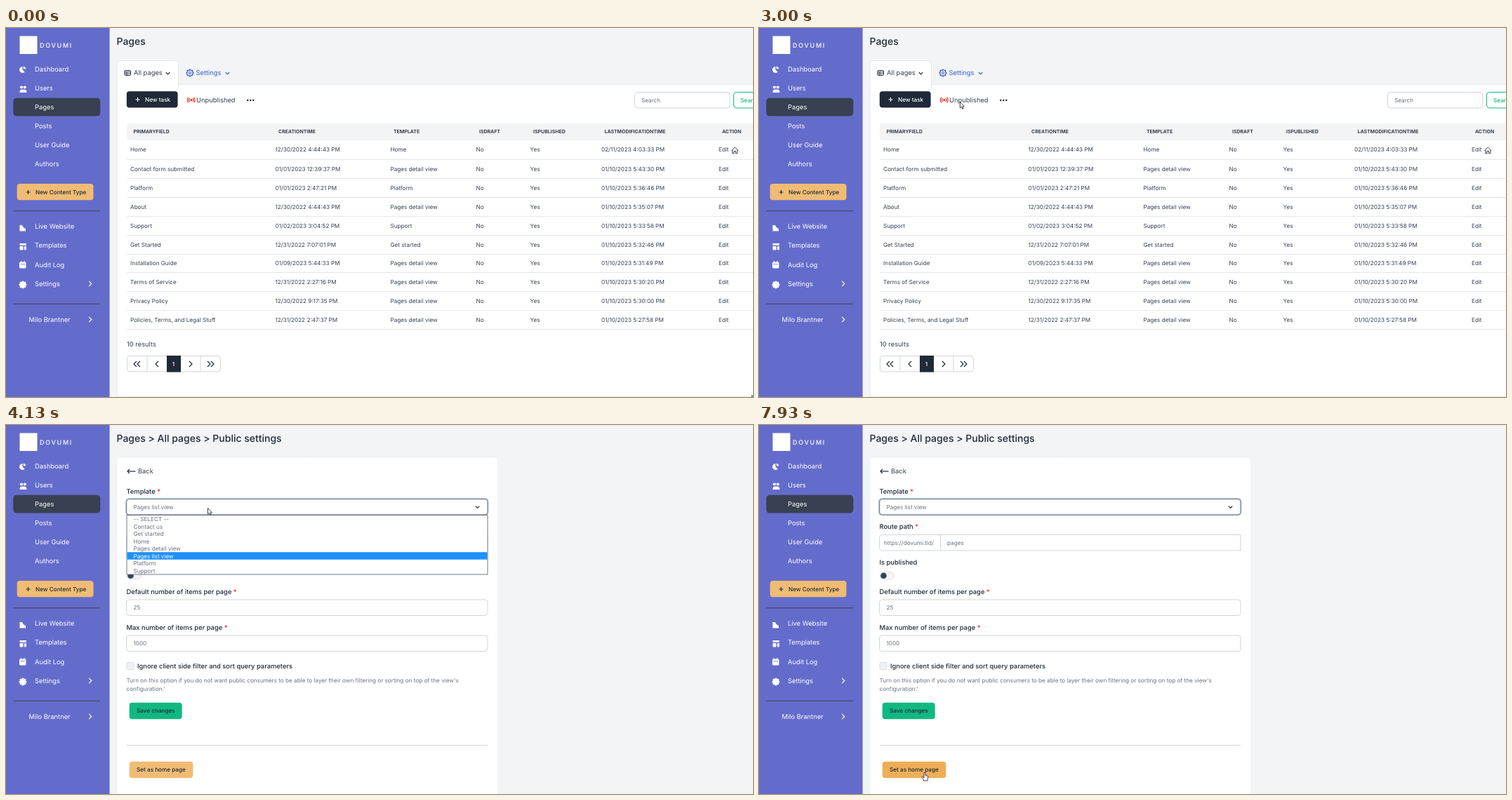
Write an HTML page with a canvas that moves like this. It is 1064 by 526 pixels and loops after 8000 ms.

```html
<!DOCTYPE html>
<html lang="en">
<head>
<meta charset="utf-8">
<title>Page settings</title>
<style>
  html, body { margin: 0; width: 100%; height: 100%; overflow: hidden; background: #f2f4f6; }
  canvas { display: block; }
</style>
</head>
<body>
<canvas id="stage" width="1064" height="526"></canvas>
<script>
const ctx = document.getElementById('stage').getContext('2d');
const LOOP = 8000, FPS = 15;
const INK = '#1f2937', BODY = '#374151', MUTED = '#6b7280', LINE = '#d1d5db', PALE = '#f2f4f6';
const AMBER = '#f0bc74', GREEN = '#10b981', BLUE = '#3f5fcb';
const SMALL = 8.16, MEDIUM = 9.35, LARGE = 14;

// y is the middle of the capitals
function text(s, x, y, size = SMALL, color = BODY, weight = 400) {
  ctx.font = `${weight} ${size}px Inter, sans-serif`;
  ctx.fillStyle = color;
  ctx.fillText(s, x, y + size * 0.364);
}

function box(x, y, w, h, r, fill, stroke, width = 1) {
  ctx.beginPath();
  ctx.roundRect(x, y, w, h, r);
  if (fill) { ctx.fillStyle = fill; ctx.fill(); }
  if (stroke) { ctx.strokeStyle = stroke; ctx.lineWidth = width; ctx.stroke(); }
}

function line(points, color, width = 1) {
  ctx.beginPath();
  points.forEach(([x, y]) => ctx.lineTo(x, y));
  ctx.strokeStyle = color;
  ctx.lineWidth = width;
  ctx.stroke();
}

function disc(x, y, r, color) {
  ctx.beginPath();
  ctx.arc(x, y, r, 0, 7);
  ctx.fillStyle = color;
  ctx.fill();
}

function ring(x, y, r, color, from = 0, to = 7, width = 1) {
  ctx.beginPath();
  ctx.arc(x, y, r, from, to);
  ctx.strokeStyle = color;
  ctx.lineWidth = width;
  ctx.stroke();
}

function shape(path, x, y, fill, stroke, width = 1) {
  const p = new Path2D(path);
  ctx.save();
  ctx.translate(x, y);
  if (fill) { ctx.fillStyle = fill; ctx.fill(p); }
  if (stroke) { ctx.strokeStyle = stroke; ctx.lineWidth = width; ctx.stroke(p); }
  ctx.restore();
}

const plus = (x, y, color) => shape('M-3 0H3M0 -3V3', x, y, null, color, 1.1);
const chevronDown = (x, y, color) => line([[x - 2.8, y - 1.4], [x, y + 1.4], [x + 2.8, y - 1.4]], color, 1.2);
const chevronSide = (x, y, dir, color, s = 4) =>
  line([[x - dir * s / 2, y - s], [x + dir * s / 2, y], [x - dir * s / 2, y + s]], color, 1.2);

function gear(x, y, r, color) {
  for (let i = 0; i < 8; i++) {
    const a = i * Math.PI / 4;
    disc(x + Math.cos(a) * r * 0.8, y + Math.sin(a) * r * 0.8, r * 0.32, color);
  }
  disc(x, y, r * 0.85, color);
}

function sidebar() {
  const white = '#fff';
  box(0, 0, 147.6, 526, 0, '#646ccb');
  box(19.5, 11.5, 25, 25.5, 0, white);
  ctx.letterSpacing = '1.7px';
  text('DOVUMI', 48, 24.5, 9, white, 500);
  ctx.letterSpacing = '0px';

  box(10.3, 99.8, 124, 25.8, 5, BODY);
  const items = [['Dashboard', 58.5], ['Users', 85.5], ['Pages', 112.5], ['Posts', 139.5], ['User Guide', 166.5],
    ['Authors', 193.5], ['Live Website', 283], ['Templates', 310], ['Audit Log', 337.5], ['Settings', 364.5]];
  items.forEach(([label, y]) => text(label, 41, y, MEDIUM, white));
  text('Milo Brantner', 32.5, 415.5, MEDIUM, white);
  chevronSide(120, 364.5, 1, white, 3.6);
  chevronSide(120, 415.5, 1, white, 3.6);

  box(15.7, 222, 108.8, 23.3, 4, AMBER);
  plus(31.5, 234, INK);
  text('New Content Type', 42, 234, SMALL, INK, 500);
  line([[10.5, 260.8], [134, 260.8]], BODY);
  line([[10.5, 393.3], [134, 393.3]], BODY);

  shape('M0 0V-4.5A4.5 4.5 0 1 0 3.2 3.2Z', 23.5, 59.5, white);
  shape('M1.3 -1.3V-5A5 5 0 0 1 5 -1.3Z', 23.5, 59.5, white);
  disc(22, 84.5, 2.1, white);
  disc(26.8, 84.5, 2.1, white);
  shape('M0 0Q0 -4.6 3.3 -4.2Q5 -4.8 6.5 -4.2Q10 -4.6 10 0Z', 19.5, 92, white);
  shape('M0 -8.5H3.5Q5 -4.5 8.5 -3.5V0H0Z', 19.5, 289.5, white);
  box(19.5, 307, 9.5, 2.8, 0.8, white);
  box(19.5, 311, 5.2, 5.4, 0.8, white);
  box(26, 311, 3, 5.4, 0.8, white);
  box(19, 333.5, 9.5, 9, 1.5, white);
  shape('M2.5 -1.5V1M7 -1.5V1', 19, 333.5, null, white, 1.2);
  line([[20.5, 336.7], [27, 336.7]], '#646ccb', 0.8);
  gear(24, 366, 5, white);
}

const COLUMNS = [177, 383.5, 547.5, 669.5, 746.5, 848, 1015];
const HEADERS = [['PRIMARYFIELD', 181.5], ['CREATIONTIME', 388], ['TEMPLATE', 552], ['ISDRAFT', 674],
  ['ISPUBLISHED', 751], ['LASTMODIFICATIONTIME', 852.5], ['ACTION', 1020]];
const DETAIL = 'Pages detail view';
const ROWS = [
  ['Home', '12/30/2022 4:44:43 PM', 'Home', '02/11/2023 4:03:33 PM'],
  ['Contact form submitted', '01/01/2023 12:39:37 PM', DETAIL, '01/10/2023 5:43:30 PM'],
  ['Platform', '01/01/2023 2:47:21 PM', 'Platform', '01/10/2023 5:36:46 PM'],
  ['About', '12/30/2022 4:44:43 PM', DETAIL, '01/10/2023 5:35:07 PM'],
  ['Support', '01/02/2023 3:04:52 PM', 'Support', '01/10/2023 5:33:58 PM'],
  ['Get Started', '12/31/2022 7:07:01 PM', 'Get started', '01/10/2023 5:32:46 PM'],
  ['Installation Guide', '01/09/2023 5:44:33 PM', DETAIL, '01/10/2023 5:31:49 PM'],
  ['Terms of Service', '12/31/2022 2:27:16 PM', DETAIL, '01/10/2023 5:30:20 PM'],
  ['Privacy Policy', '12/30/2022 9:17:35 PM', DETAIL, '01/10/2023 5:30:00 PM'],
  ['Policies, Terms, and Legal Stuff', '12/31/2022 2:47:37 PM', DETAIL, '01/10/2023 5:27:58 PM'],
];

function listView() {
  text('Pages', 157.5, 18.5, LARGE, INK, 500);
  box(158, 80.5, 920, 445, 0, '#fff', '#e5e7eb');
  box(158, 46.5, 87.5, 40, [4, 4, 0, 0], '#fff', '#e5e7eb');
  box(158.5, 80, 86.5, 10, 0, '#fff');

  box(169, 60.5, 8.5, 7, 1, null, INK, 1);
  shape('M0 2.2H8.5M0 4.6H8.5M3 2V7', 169, 60.5, null, INK, 0.9);
  text('All pages', 182, 63.5, MEDIUM, BODY);
  chevronDown(230.5, 64.5, INK);
  gear(262, 64, 5, BLUE);
  disc(262, 64, 3.5, PALE);
  ring(262, 64, 1.6, BLUE);
  text('Settings', 270.5, 63.5, MEDIUM, BLUE);
  chevronDown(315.5, 64.5, BLUE);

  box(171.8, 90.2, 72.8, 23.3, 4, INK);
  plus(187.5, 102, '#fff');
  text('New task', 198, 102, SMALL, '#fff', 500);
  const red = '#f0261c';
  disc(263.8, 102.5, 1.5, red);
  for (const r of [3.2, 5.4]) {
    ring(263.8, 102.5, r, red, -0.8, 0.8, 1.1);
    ring(263.8, 102.5, r, red, Math.PI - 0.8, Math.PI + 0.8, 1.1);
  }
  text('Unpublished', 271, 102.5, MEDIUM, BODY);
  for (const x of [344.3, 348.3, 352.3]) disc(x, 103, 1.2, INK);

  box(895.5, 91.5, 135.5, 22.5, 4, '#fff', LINE);
  text('Search', 905, 103, SMALL, MUTED);
  box(1036.5, 91.5, 60, 22.5, 4, '#fff', GREEN);
  text('Search', 1046, 103, SMALL, GREEN, 500);

  box(172, 136, 910, 24, 4, PALE);
  HEADERS.forEach(([label, x]) => text(label, x, 147.5, 7, INK, 600));
  ROWS.forEach(([name, created, template, modified], i) => {
    const y = i ? 174.4 + i * 26.85 : 173.5;
    [name, created, template, 'No', 'Yes', modified, 'Edit'].forEach((s, c) => text(s, COLUMNS[c], y));
    const rule = Math.round(187 + i * 26.9) + 0.5;
    line([[172, rule], [1064, rule]], '#e5e7eb');
  });
  shape('M-4.8 .5L0 -4.3L4.8 .5M-3.5 -.5V4.5H-1.2V1.2H1.2V4.5H3.5V-.5', 1038.3, 174.3, null, INK, 0.9);

  text('10 results', 172, 450.5, MEDIUM, BODY);
  box(172.5, 467.5, 133, 22.5, 4, '#fff', LINE);
  for (const x of [201, 277]) line([[x, 467.5], [x, 490]], LINE);
  box(229, 467, 20, 23.5, 0, INK);
  text('1', 236.8, 479, SMALL, '#fff', 500);
  chevronSide(184, 479, -1, INK);
  chevronSide(189, 479, -1, INK);
  chevronSide(215, 479, -1, INK);
  chevronSide(263, 479, 1, INK);
  chevronSide(289, 479, 1, INK);
  chevronSide(294, 479, 1, INK);
}

const SAVE = [175.7, 395.7, 75, 23.6], SET_HOME = [175.7, 479.7, 90.6, 23.6];
const OPTIONS = ['-- SELECT --', 'Contact us', 'Get started', 'Home', DETAIL, 'Pages list view', 'Platform', 'Support'];
const inside = ([x, y, w, h], p) => p.x >= x && p.x <= x + w && p.y >= y && p.y <= y + h;

function label(s, y, required = true) {
  text(s, 171.5, y, MEDIUM, INK, 500);
  if (required) text('*', 171.5 + ctx.measureText(s + ' ').width, y, MEDIUM, '#f0261c', 500);
}

function field(value, y) {
  box(171.5, y, 514.5, 22.5, 4, '#fff', LINE);
  text(value, 181.5, y + 11.5, SMALL, MUTED);
}

function formView(frame, pointer) {
  text('Pages > All pages > Public settings', 157.5, 18.5, LARGE, INK, 500);
  box(158, 46, 542.5, 500, 4, '#fff', '#eceef1', 0.7);
  line([[184.5, 66], [173, 66]], INK, 1.2);
  line([[176, 63], [173, 66], [176, 69]], INK, 1.2);
  text('Back', 188, 65.5, MEDIUM, BODY);

  label('Template', 94.5);
  field('Pages list view', 105.5);
  const focus = Math.min(1, Math.max(0, (frame - 58) / 3));
  if (focus) {
    ctx.globalAlpha = focus;
    box(171.3, 105.3, 515, 23, 4, null, '#c3cad4', 2.6);
    box(171.5, 105.5, 514.5, 22.5, 4, null, '#7c8798');
    ctx.globalAlpha = 1;
  }
  chevronDown(671.5, 117, INK);

  label('Route path', 145);
  box(171.5, 156.5, 514.5, 22.5, [4, 0, 0, 4], '#fff', LINE);
  line([[258.5, 156.5], [258.5, 179]], LINE);
  text('https://dovumi.tld/', 178, 168, SMALL, MUTED);
  text('pages', 268, 168, SMALL, MUTED);

  label('Is published', 196, false);
  box(172, 209.5, 20.5, 10.5, 5.25, PALE, '#d9dde3', 0.8);
  disc(177.5, 214.7, 4.3, BODY);

  label('Default number of items per page', 238);
  field('25', 249);
  label('Max number of items per page', 288.5);
  field('1000', 300);

  box(172, 338.5, 10, 10, 2, '#eff1f4', LINE, 0.8);
  text('Ignore client side filter and sort query parameters', 187, 343.5, MEDIUM, INK, 500);
  text("Turn on this option if you do not want public consumers to be able to layer their own filtering or sorting on top of the view's",
    171.5, 364, SMALL, MUTED);
  text("configuration.'", 171.5, 376, SMALL, MUTED);

  box(...SAVE, 4, inside(SAVE, pointer) ? '#0ea271' : GREEN);
  text('Save changes', 186, 407.5, SMALL, INK, 500);
  line([[172, 456.5], [686, 456.5]], LINE);
  box(...SET_HOME, 4, inside(SET_HOME, pointer) ? '#eeae58' : AMBER);
  text('Set as home page', 186, 491.5, SMALL, INK, 500);

  if (frame >= 60 && frame < 93) {
    box(172, 128.5, 514, 84.5, 0, '#fff', '#6f7782');
    box(172.5, 181.3, 513, 10.5, 0, '#1e90ff');
    OPTIONS.forEach((s, i) => text(s, 181.5, 134.2 + i * 10.5, SMALL, i === 5 ? '#fff' : MUTED));
  }
}

// Each move is a list of [frame, x, y]; the pointer rests between moves.
const MOVES = [
  [[0, 1062, 523], [5, 850, 390], [9, 650, 275], [13, 506, 195], [16, 419, 155],
    [22, 279, 102], [26, 315, 115], [29, 277, 100], [30, 286, 105]],
  [[54, 286, 105], [58, 287, 118]],
  [[99, 287, 118], [102, 400, 140], [106, 666, 230], [109, 380, 360], [111, 232, 400],
    [112, 254, 405], [113, 238, 409], [115, 234, 440], [119, 236, 495]],
];

function pointerAt(frame) {
  const move = MOVES.filter(m => m[0][0] <= frame).pop();
  const last = move.length - 1;
  if (frame >= move[last][0]) return { x: move[last][1], y: move[last][2] };
  const i = move.findIndex(k => k[0] > frame) - 1;
  const a = move[i], b = move[i + 1], span = b[0] - a[0], u = (frame - a[0]) / span;
  const slope = (k, axis) => k === 0 || k === last ? 0
    : (move[k + 1][axis] - move[k - 1][axis]) / (move[k + 1][0] - move[k - 1][0]);
  const hermite = axis => {
    const e = u * u * (3 - 2 * u);
    return a[axis] + (b[axis] - a[axis]) * e
      + span * u * (1 - u) * ((1 - u) * slope(i, axis) - u * slope(i + 1, axis));
  };
  return { x: hermite(1), y: hermite(2) };
}

const ARROW = 'M.4 .4V9.2L2.4 7.4L3.8 10.6L5.2 10L3.8 6.9H6.5Z';
const HAND = 'M-1 .8Q0 -.6 1 .8V4.6L4 5.2Q5 5.6 4.8 7L4 10V12H-1.6V10.6L-4 7.4Q-4 6 -2.6 6.6L-1 8Z';

function draw(frame) {
  const pointer = pointerAt(frame);
  const form = frame >= 46;
  box(0, 0, 1064, 526, 0, PALE);
  if (form) formView(frame, pointer); else listView();
  sidebar();
  const hand = form && (inside(SAVE, pointer) || inside(SET_HOME, pointer));
  shape(hand ? HAND : ARROW, pointer.x, pointer.y, '#fff', '#30343b', 0.9);
}

ctx.textRendering = 'geometricPrecision';
function tick() {
  // The small offset absorbs rounded times at step boundaries.
  draw(Math.floor((performance.now() % LOOP + 4) * FPS / 1000) % 120);
  requestAnimationFrame(tick);
}
tick();
</script>
</body>
</html>
```
